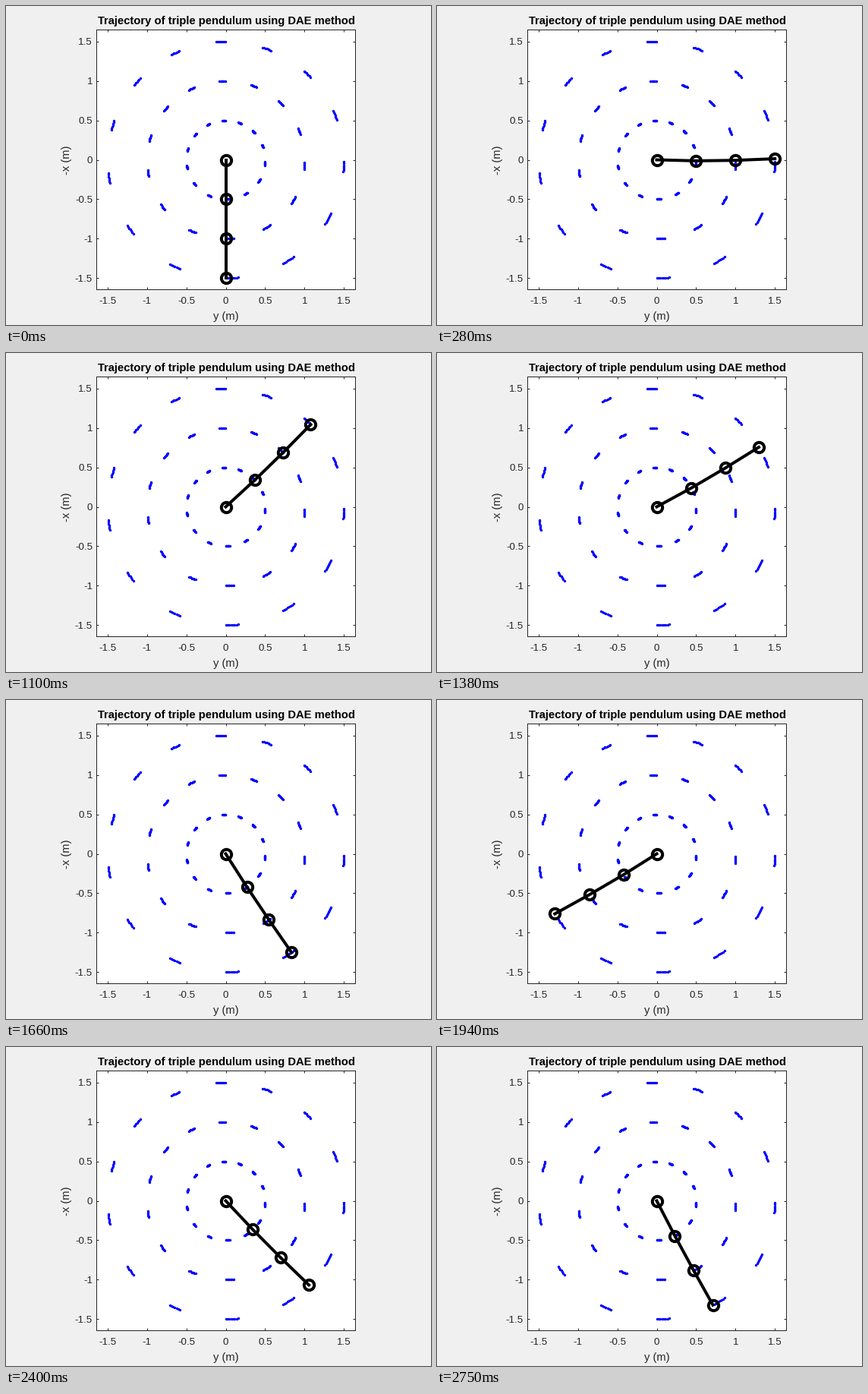
Write a matplotlib script that moves like this. It is 560 by 420 pixels and loops after 2820 ms.

```python
import numpy as np
import matplotlib.pyplot as plt
from matplotlib.animation import FuncAnimation

plt.rcParams["font.family"] = "Liberation Sans"
plt.rcParams["axes.unicode_minus"] = False

W, H, DPI = 560, 420, 100
PT = 72 / DPI                      # points per pixel
LOOP, STEP = 2820, 10              # ms
LINK, PERIOD = 0.5, 0.6985         # m, s per revolution
INK = "#262626"

# A whirling pendulum is faster at the bottom: map swept angle to time.
turn = np.linspace(0, 8 * 360, 8 * 720 + 1)
pace = 1 / np.sqrt(1 + 0.202 * np.cos(np.radians(turn)))
clock = np.concatenate([[0], np.cumsum((pace[1:] + pace[:-1]) / 2)])
clock *= PERIOD / clock[720]


def joints(time):
    """Positions of the pivot and the three joints at a time in seconds."""
    a = np.radians(np.interp(time, clock, turn))
    # Gravity bends the chain: inner links trail, outer links lead.
    a = a + np.radians([-0.8, 1.4, 3.0]) * np.sin(a)
    x = np.concatenate([[0], np.cumsum(LINK * np.sin(a))])
    y = np.concatenate([[0], np.cumsum(-LINK * np.cos(a))])
    return x, y


# Poses last 70 ms, apart from two long holds and a few short ones.
holds = np.full(33, 70)
holds[:2] = 280, 430
holds[[4, 6, 8, 23]] = 60
holds[24] = 50
starts = np.cumsum(holds) - holds

# Playback stutters at first, then runs at a steady 1.91 times real time.
times = np.interp(starts, [0, 280, 710, 850, 910, 1380, 2750],
                  [0, 0.162, 0.294, 0.561, 0.692, 1.618, 4.240])
poses = [joints(t) for t in times]

fig = plt.figure(figsize=(W / DPI, H / DPI), dpi=DPI, facecolor="#f0f0f0")
ax = fig.add_axes([119 / W, 47 / H, 341 / W, 342 / H])
ax.set(xlim=(-1.642, 1.642), ylim=(-1.641, 1.651))

ticks = np.arange(-3, 4) / 2
labels = [f"{v:g}" for v in ticks]
ax.set_xticks(ticks, labels)
ax.set_yticks(ticks, labels)
ax.tick_params(direction="in", top=True, right=True, length=3.4 * PT,
               width=PT, color=INK, labelcolor=INK, labelsize=13.33 * PT)
ax.tick_params(axis="x", pad=10.5 * PT)
ax.tick_params(axis="y", pad=5 * PT)
for spine in ax.spines.values():
    spine.set(color=INK, linewidth=PT)


def label(x, y, text, **style):
    fig.text(x / W, 1 - y / H, text, ha="center", fontsize=14.7 * PT, **style)


label(290.3, 24, "Trajectory of triple pendulum using DAE method",
      weight="bold", color="black")
label(290, 413, "y (m)", color=INK)
label(80, 202.5, "-x (m)", color=INK, rotation=90, va="center")

# Path samples every 0.05 s over five seconds.
samples = [joints(t) for t in np.arange(101) * 0.05]
dots_x, dots_y = (np.array([s[k][1:] for s in samples]).ravel() for k in (0, 1))
ax.plot(dots_x, dots_y, "o", color="blue", ms=3.4 * PT, mew=0)

chain, = ax.plot([], [], "-o", color="black", lw=4 * PT, ms=13.33 * PT,
                 mfc="none", mec="black", mew=4 * PT, clip_on=False, zorder=5)


def update(frame):
    pose = np.searchsorted(starts, frame * STEP, side="right") - 1
    chain.set_data(*poses[pose])
    return chain,


anim = FuncAnimation(fig, update, frames=LOOP // STEP, interval=STEP,
                     repeat=True, repeat_delay=0)
plt.show()
```
